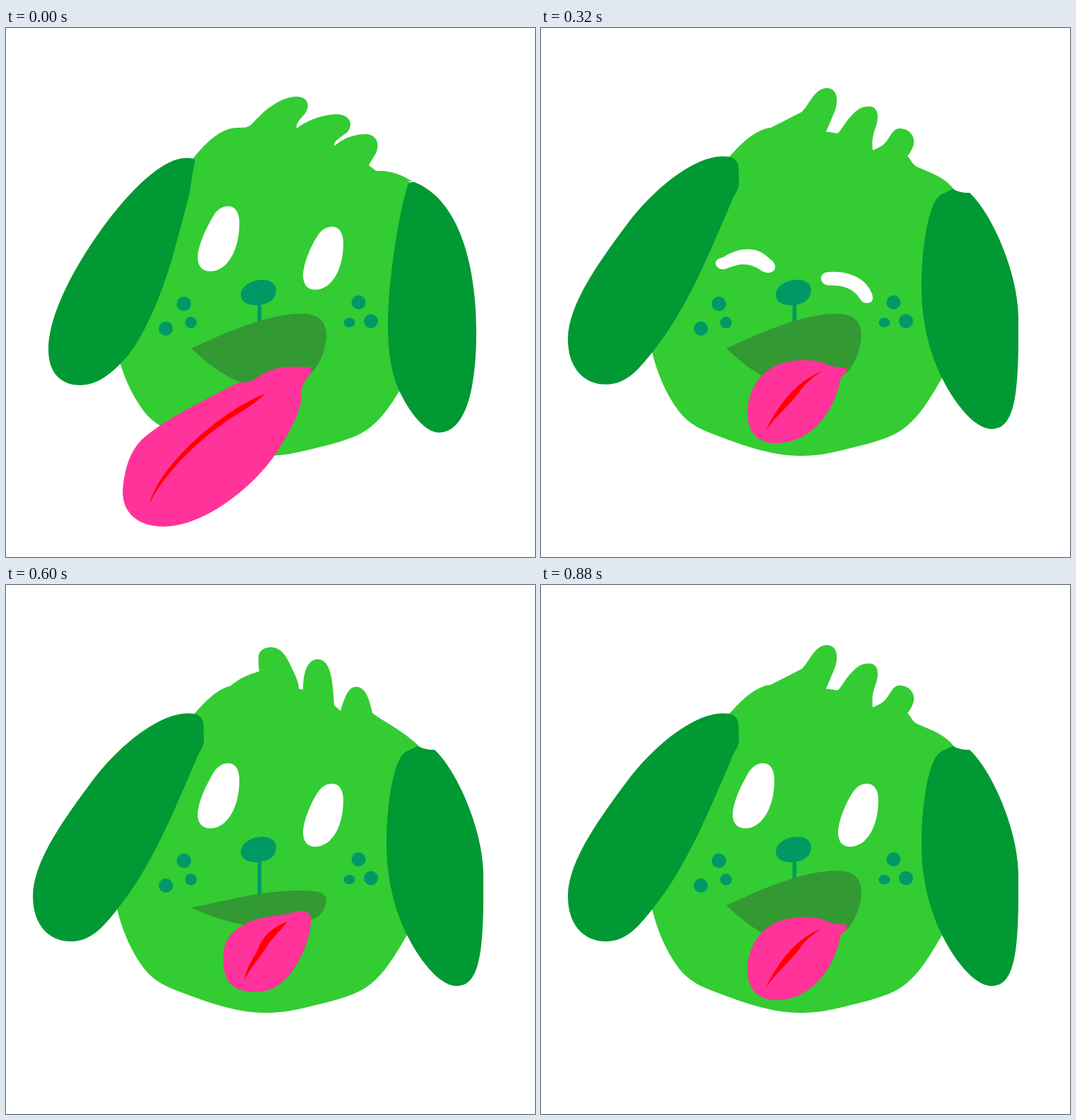
Write an HTML page that moves like this. It is 748x748 px and loops after 0.96 s.

```html
<!DOCTYPE html>
<html lang="en">
<head>
<meta charset="utf-8">
<title>Happy dog</title>
<style>
html, body { margin: 0; height: 100%; overflow: hidden; background: #fff; }
svg { display: block; width: 100%; height: 100%; }
</style>
</head>
<body>
<svg viewBox="0 0 748 748">
  <g fill="#3c3">
    <path d="M264,185L330,150L400,165L510,203L566,214L583,228L567,495L557,512C541,538 524,565 492,578C472,586 450,591 430,596C410,601 390,605 368,605C325,605 285,590 240,573C215,563 202,553 190,535C174,512 163,483 157,458Z"/>
    <path data-part="hair" data-look="swept" d="M264,185C286,158 306,140 330,141C345,141 345,138 355,128C378,104 398,97 412,97C427,98 431,110 422,122C414,131 410,135 411,142C425,131 448,122 468,122C485,122 492,135 483,147C470,157 463,160 464,167C480,153 498,150 510,150C524,151 529,164 523,177L513,194L523,202C545,201 560,208 575,217Z"/>
    <path data-part="hair" data-look="lifted" d="M264,185C287,158 306,143 325,141L368,119C378,112 386,85 404,85C420,85 420,103 416,116L403,147C412,147 416,149 419,149C424,147 430,132 441,122C448,114 455,111 464,111C477,111 478,125 474,138C468,155 468,160 469,173C483,167 486,165 494,152C499,144 503,142 508,142C523,143 529,155 527,164C526,170 521,178 518,181C523,185 524,192 531,196L552,205C565,211 575,217 583,227Z"/>
    <path data-part="hair" data-look="upright" d="M264,185C287,158 301,147 317,143C330,132 342,127 358,122C357,113 357,108 357,102C357,94 364,88 375,88C390,88 398,104 402,113C410,130 414,137 414,147L420,148C420,122 427,105 441,105C461,106 462,140 464,170L473,178C480,155 485,144 495,144C509,144 514,163 518,181C535,194 560,205 583,227Z"/>
  </g>
  <g fill="#093">
    <path data-part="ears" data-look="in" d="M267,191C268,185 265,184 258,184C223,181 177,230 145,271C108,320 60,398 60,455C60,487 77,505 105,505C130,505 150,488 171,465C198,432 222,372 238,315L258,240C262,225 263,203 267,191ZM568,222C571,217 576,217 580,219C645,247 665,345 665,430C665,510 650,572 612,572C594,572 572,547 556,513C543,485 540,450 540,420C540,365 553,272 568,222Z"/>
    <path data-part="ears" data-look="out" d="M279,195C278,188 272,183 266,182C220,175 157,230 122,277C85,327 38,390 38,440C38,480 60,504 92,504C120,504 137,484 157,459C205,400 235,325 268,249C272,236 280,230 280,218ZM582,227C588,231 595,233 606,233C640,265 675,350 675,410L675,450C674,530 666,567 637,567C615,567 587,535 567,495C545,450 538,405 538,365C538,310 548,255 560,241C568,231 574,234 582,227Z"/>
  </g>
  <g fill="#fff">
    <path data-part="eyes" data-look="open" d="M314,252C325,252 330,262 330,276C330,314 313,344 289,344C275,344 271,334 271,323C273,302 285,280 293,266C299,256 306,252 314,252ZM461,281C472,281 477,291 477,304C477,341 461,370 437,370C424,370 420,360 420,348C422,328 433,305 441,293C447,284 454,281 461,281Z"/>
    <path data-part="eyes" data-look="half" d="M291,285L304,285C318,286 324,294 324,304C322,325 306,346 290,346C278,346 274,341 274,331C274,318 276,306 280,300C283,294 282,286 291,285ZM447,316C460,316 471,327 471,342C470,357 456,371 441,371C426,370 418,362 419,351C420,336 422,327 425,322C430,317 438,316 447,316Z"/>
    <path data-part="eyes" data-look="shut" d="M258,324C278,311 303,307 322,325C330,331 333,336 330,342C327,347 319,347 313,344C297,333 285,331 263,340C255,343 249,340 247,334C246,329 250,326 258,324ZM407,345C440,343 461,357 468,376C471,384 468,389 461,389C455,389 453,386 449,380C441,369 428,363 407,364C400,363 396,359 396,354C396,349 400,345 407,345Z"/>
  </g>
  <g fill="#096">
    <path d="M363,356C376,356 382,363 382,371C381,384 372,391 354,392C341,392 332,387 332,377C333,365 346,356 363,356ZM355.7,388h5.5v52h-5.5Z"/>
    <circle cx="251.5" cy="390" r="10.2"/>
    <circle cx="226" cy="425" r="10"/>
    <circle cx="261.5" cy="416.5" r="8.3"/>
    <circle cx="498.5" cy="388" r="10"/>
    <circle cx="516" cy="414.5" r="10"/>
    <ellipse cx="485.5" cy="416.5" rx="8" ry="6.7"/>
  </g>
  <g fill="#393">
    <path data-part="mouth" data-look="wide" d="M262,453C300,436 365,404 418,404C443,404 453,415 453,436C452,452 446,472 433,487L425,490L345,504L333,502C310,493 285,475 262,453Z"/>
    <path data-part="mouth" data-look="small" d="M262,456C310,447 360,432 415,432C445,432 453,436 453,447C452,458 445,470 431,473L400,490L350,483C320,478 290,470 262,456Z"/>
  </g>
  <g fill="#f39">
    <g data-part="tongue" data-look="long">
      <path d="M432,480L432,488C424,495 418,508 417,512C422,535 402,570 380,604C345,655 275,705 224,705C185,705 165,685 165,655C167,628 173,602 191,583C220,556 275,529 325,503C335,500 340,501 346,500C370,483 385,478 410,479Z"/>
      <path fill="red" d="M367,517C318,534 222,608 203,672C229,619 293,564 342,537C350,531 358,525 367,517Z"/>
    </g>
    <g data-part="tongue" data-look="mid">
      <path d="M432,480L432,487L424,494C415,545 380,587 333,587C305,587 292,570 292,545C292,505 318,475 355,471C367,468 395,469 405,476C413,479 421,480 432,480Z"/>
      <path fill="red" d="M398,485C355,502 332,540 317,571C330,550 350,535 365,515C373,503 385,493 398,485Z"/>
    </g>
    <g data-part="tongue" data-look="short">
      <path d="M416,461C428,460 434,468 431,480C428,505 417,530 402,550C388,567 372,575 358,575C325,577 307,565 307,530C306,500 322,485 350,474C370,467 395,467 405,463Z"/>
      <path fill="red" d="M398,476C375,484 362,498 355,518C345,535 340,543 337,559C345,542 357,530 366,515C377,498 385,492 398,476Z"/>
    </g>
  </g>
</svg>
<script>
const LOOP = 960;
// Each part holds a look from its start time (ms) until the next entry.
const tracks = {
  hair: [[0, 'swept'], [80, 'lifted'], [400, 'swept'], [480, 'lifted'], [560, 'upright'],
    [640, 'lifted'], [720, 'swept'], [800, 'lifted']],
  ears: [[0, 'in'], [160, 'out'], [400, 'in'], [560, 'out'], [720, 'in'], [800, 'out']],
  eyes: [[0, 'open'], [240, 'half'], [320, 'shut'], [400, 'open'], [640, 'half'],
    [720, 'shut'], [800, 'half'], [880, 'open']],
  mouth: [[0, 'wide'], [240, 'small'], [320, 'wide'], [600, 'small'], [680, 'wide'],
    [800, 'small'], [880, 'wide']],
  tongue: [[0, 'long'], [120, 'mid'], [240, 'short'], [320, 'mid'], [400, 'long'], [520, 'mid'],
    [600, 'short'], [680, 'mid'], [720, 'long'], [800, 'short'], [880, 'mid']]
};
const shapes = document.querySelectorAll('[data-part]');
const lookAt = (part, time) => tracks[part].findLast(([start]) => start <= time)[1];

function draw() {
  const time = performance.now() % LOOP;
  for (const shape of shapes) {
    const { part, look } = shape.dataset;
    shape.style.display = lookAt(part, time) === look ? '' : 'none';
  }
  requestAnimationFrame(draw);
}
draw();
</script>
</body>
</html>
```
